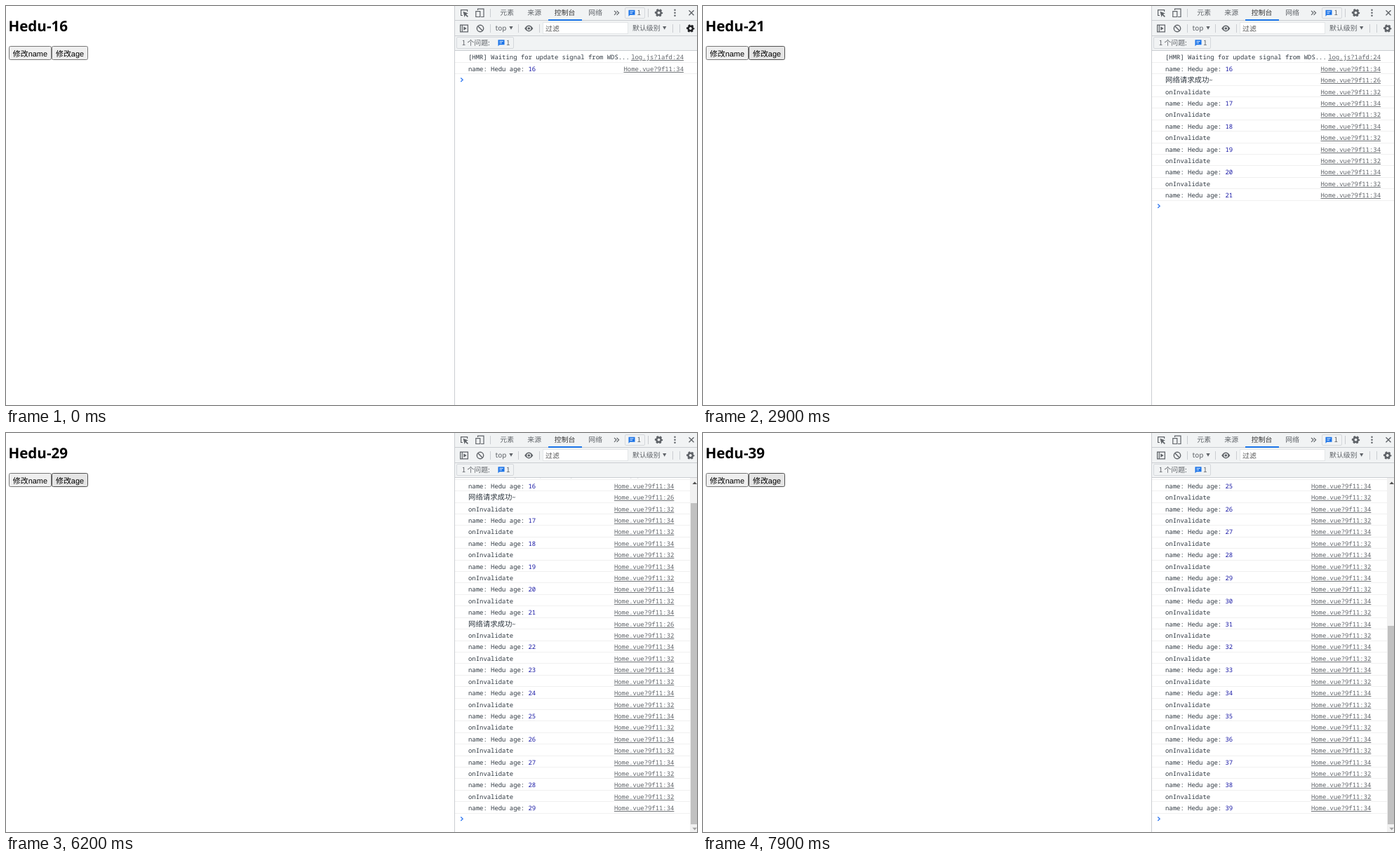
Animation, 985 px wide and 569 px high, one loop 8000 ms. Source, as an HTML page:

```html
<!DOCTYPE html>
<html lang="zh">
<head>
<meta charset="utf-8">
<title>Console</title>
<style>
  html, body { margin: 0; width: 100%; height: 100%; overflow: hidden; background: #fff; }
  svg { display: block; text-rendering: geometricPrecision; }
  .ui { font: 9.9px "Noto Sans CJK SC", "Noto Sans", sans-serif; fill: #5f6368; }
  .title { font: bold 20.6px "Open Sans", "Noto Sans", sans-serif; fill: #000; }
  .btn { font: 10.95px "Liberation Sans", "Noto Sans CJK SC", sans-serif; fill: #000; }
  .log { font: 8.92px "Noto Sans Mono", "DejaVu Sans Mono", monospace; fill: #303942; }
  .cjk { font: 10.4px "Noto Sans CJK SC", sans-serif; }
  .num { fill: #1a1aa6; }
  .link { text-anchor: end; text-decoration: underline; fill: #5f6368; }
  .icon { fill: none; stroke: #5f6368; stroke-width: 1.2; }
  .solid { fill: #5f6368; }
</style>
</head>
<body>
<svg id="stage" width="985" height="569" viewBox="0 0 985 569">
  <defs>
    <clipPath id="view"><rect x="640" y="64" width="345" height="505"/></clipPath>
    <g id="gear" fill="none" stroke="currentColor">
      <circle r="3.2" stroke-width="2.6"/>
      <circle r="4.7" stroke-width="2" stroke-dasharray="2.7 2.222" stroke-dashoffset="1.35"/>
    </g>
    <path id="chat" fill="#1a73e8" d="M-4.5-4h9v7h-7l-2 2z"/>
    <path id="chatLines" stroke="#fff" stroke-width=".9" d="M-2.6-1.8h5.2M-2.6.5h3.6"/>
    <path id="drop" class="solid" d="M-2.6-2.2h5.2l-2.6 4.6z"/>
  </defs>

  <text class="title" id="title" x="3.4" y="36"></text>
  <rect x="4.5" y="57.5" width="60" height="19" rx="2" fill="#efefef" stroke="#767676"/>
  <rect id="ageBtn" x="65.5" y="57.5" width="51" height="19" rx="2"/>
  <text class="btn" x="9.8" y="71.5">修改name</text>
  <text class="btn" x="71" y="71.5">修改age</text>

  <rect x="640" width="345" height="64" fill="#f1f3f4"/>
  <path stroke="#cacdd1" d="M639.5 0V569M640 20.5H985M640 42.5H985M640 63.5H985"/>
  <path stroke="#cacdd1" d="M690.5 4V16M915.5 4V16M690.5 26V38M730.5 26V38M760.5 26V38M950.5 26V38M960.5 26V38"/>
  <rect x="773" y="19" width="48" height="2" fill="#1a73e8"/>

  <g class="icon">
    <path d="M651 13.5H648.6V5.6H657.6V8"/>
    <path class="solid" stroke="none" d="M651.5 7.8l7.4 2.8-3 1.2 3 3-1.1 1.1-3-3-1.2 3z"/>
    <path d="M672.5 6V4.1H681V15.5H677M669.8 7.6H675.8V15.5H669.8z"/>
    <path d="M867 6.8l3 3-3 3M870.6 6.8l3 3-3 3"/>
    <path stroke-width="1.4" d="M973.5 6.2l7 7M980.5 6.2l-7 7"/>
    <path d="M647.6 27.2H658.4V36.8H647.6zM650.3 27.2V36.8"/>
    <path class="solid" stroke="none" d="M652.3 29.2l4.4 2.8-4.4 2.8z"/>
    <circle cx="676" cy="32" r="4.7" stroke-width="1.4"/>
    <path stroke-width="1.4" d="M672.8 28.8l6.4 6.4"/>
    <path class="solid" stroke="none" d="M739.2 32Q745.3 23.2 751.4 32Q745.3 40.8 739.2 32z"/>
    <circle cx="745.3" cy="32" r="2.4" stroke="#f1f3f4"/>
  </g>
  <g class="solid">
    <circle cx="953.5" cy="5.8" r="1.2"/><circle cx="953.5" cy="9.8" r="1.2"/><circle cx="953.5" cy="13.8" r="1.2"/>
  </g>
  <use href="#gear" x="930.5" y="9.7" color="#5f6368"/>
  <use id="gear2" href="#gear" x="975.7" y="32"/>
  <use href="#drop" x="720" y="31.3"/>
  <use href="#drop" x="938.7" y="31.3"/>

  <g fill="#f1f3f4" stroke="#d5d8dc">
    <rect x="882.5" y="2.5" width="28" height="15" rx="1.5"/>
    <rect x="642.5" y="44.5" width="81" height="16" rx="1.5"/>
    <rect x="765.5" y="23.5" width="121" height="16" fill="#fff" stroke="#e4e6e8"/>
  </g>
  <use href="#chat" x="892" y="9.7"/><use href="#chatLines" x="892" y="9.7"/>
  <use href="#chat" x="706" y="52.2"/><use href="#chatLines" x="706" y="52.2"/>

  <g class="ui">
    <text x="704.3" y="13.4">元素</text>
    <text x="743.3" y="13.4">来源</text>
    <text x="781.8" y="13.4" fill="#333">控制台</text>
    <text x="830.3" y="13.4">网络</text>
    <text x="899.5" y="13.3">1</text>
    <text x="697.6" y="35.4">top</text>
    <text x="769" y="35.8" fill="#555">过滤</text>
    <text x="893" y="35.4">默认级别</text>
    <text x="649.8" y="56.4">1 个问题:</text>
    <text x="713" y="56.4">1</text>
  </g>

  <g id="console" clip-path="url(#view)"></g>
</svg>
<script>
const LOOP = 8000, STEP = 100;
const USER = 'Hedu', FIRST_AGE = 16;
const ROW = 16.41, TOP = 73.1, LAST_Y = 535;
const clicks = [
  2200, 2400, 2600, 2800, 2900,
  5100, 5300, 5400, 5600, 5700, 5900, 6100, 6200,
  6400, 6500, 6700, 6800, 7000, 7200, 7400, 7500, 7700, 7900
];
const replies = [1500, 4600];
const looks = {
  idle: ['#efefef', '#767676'],
  hover: ['#e5e5e5', '#4f4f4f'],
  down: ['#f5f5f5', '#8d8d8d']
};

const $ = id => document.getElementById(id);
const entry = (at, html, link) => ({ at, html, link });
const ageEntry = (at, age) =>
  entry(at, `name: ${USER} age: <tspan class="num">${age}</tspan>`, 'Home.vue?9f11:34');

const entries = [
  entry(0, '[HMR] Waiting for update signal from WDS...', 'log.js?1afd:24'),
  ageEntry(0, FIRST_AGE),
  ...replies.map(at => entry(at, '<tspan class="cjk">网络请求成功</tspan>~', 'Home.vue?9f11:26')),
  ...clicks.flatMap((at, i) => [
    entry(at, 'onInvalidate', 'Home.vue?9f11:32'),
    ageEntry(at, FIRST_AGE + 1 + i)
  ])
].sort((a, b) => a.at - b.at);

function scrollbar(scroll) {
  const thumbTop = 558 - 242900 / (516 + scroll);
  return `<rect x="975" y="64" width="10" height="505" fill="#f1f1f1"/>
    <rect x="976" y="${Math.round(thumbTop)}" width="9" height="${558 - Math.round(thumbTop)}" fill="#c1c1c1"/>
    <path fill="#505050" d="M978.5 73h6.5l-3.3-3.6z"/>
    <path fill="#a3a3a3" d="M978.5 562.8h6.5l-3.3 3.6z"/>`;
}

function drawConsole(time) {
  const shown = entries.filter(e => e.at <= time);
  const endY = TOP + ROW * (shown.length - 1);
  const scroll = Math.max(0, endY - LAST_Y);
  const right = scroll ? 975 : 985;
  const linkX = scroll ? 952.4 : 966;
  let out = '';
  shown.forEach((e, i) => {
    const y = TOP + ROW * i - scroll;
    if (y < 50) return;
    const base = Math.round(y + 3.2);
    out += `<rect x="640" y="${Math.floor(y + 7.2)}" width="${right - 640}" height="1" fill="#f0f0f0"/>
      <text class="log" x="659" y="${base}">${e.html}</text>
      <text class="log link" x="${linkX}" y="${base}">${e.link}</text>`;
  });
  const py = Math.round(endY - scroll + 15) + .3;
  out += `<path fill="none" stroke="#367cf1" stroke-width="1.4" d="M648.3 ${py - 2.7}l2.8 2.7-2.8 2.7"/>`;
  if (scroll) out += scrollbar(scroll);
  $('console').innerHTML = out;
}

function draw(time) {
  const pressed = clicks.includes(time + STEP) && !clicks.includes(time);
  const [fill, stroke] = looks[time < 900 ? 'idle' : pressed ? 'down' : 'hover'];
  $('ageBtn').setAttribute('fill', fill);
  $('ageBtn').setAttribute('stroke', stroke);
  $('gear2').setAttribute('color', time < 100 ? '#202124' : '#5f6368');
  $('title').textContent = `${USER}-${FIRST_AGE + clicks.filter(c => c <= time).length}`;
  drawConsole(time);
}

let last = -1;
function tick() {
  const time = Math.floor(performance.now() % LOOP / STEP) * STEP;
  if (time !== last) draw(last = time);
  requestAnimationFrame(tick);
}
tick();
</script>
</body>
</html>
```
